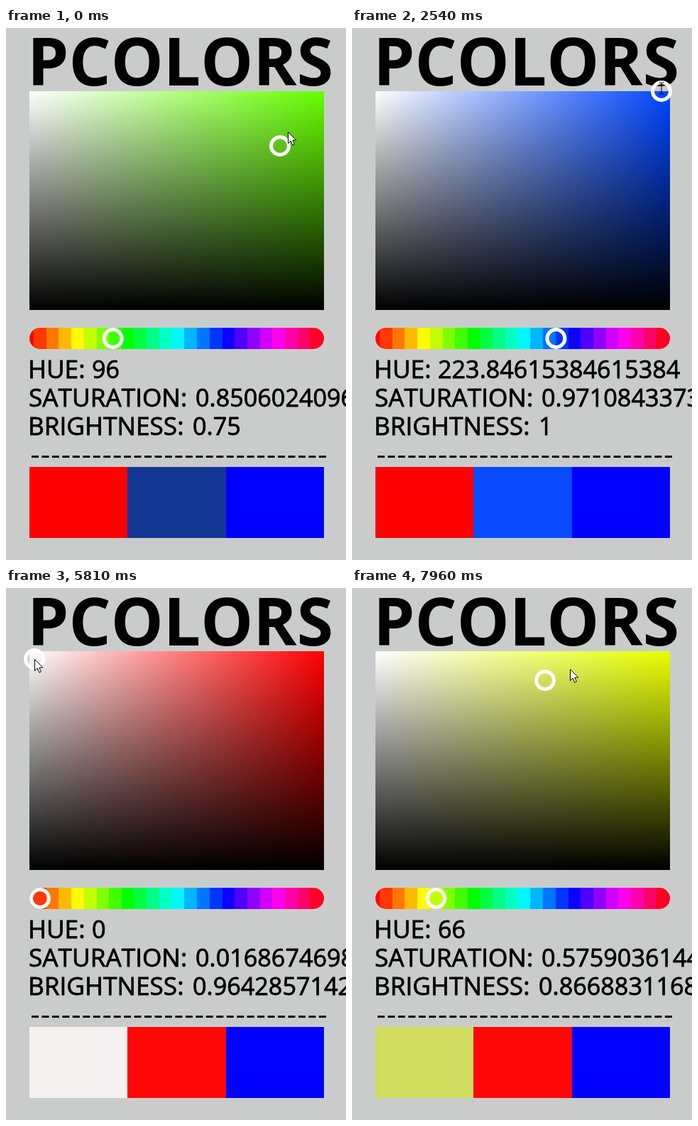
Write an HTML page that moves like this. It is 479x749 px and loops after 8000 ms.

```html
<!DOCTYPE html>
<html lang="en">
<head>
<meta charset="utf-8">
<title>Color picker</title>
<style>
  html, body { margin: 0; height: 100%; overflow: hidden; background: #cacccb; }
  svg { display: block; width: 100%; height: 100%; }
  text {
    font: 35.2px "Open Sans", "Noto Sans", sans-serif;
    font-kerning: none; stroke: #000; stroke-width: .8;
  }
  .title { font-size: 93px; font-weight: 700; stroke: none; }
  .value { font-size: 34.2px; }
  .ring { fill: none; stroke: #fff; stroke-width: 5; }
  #cursors path { fill: #fff; stroke: #000; stroke-linejoin: round; }
  #cursors #beam { fill: none; }
</style>
</head>
<body>
<svg viewBox="0 0 479 749">
  <defs>
    <linearGradient id="white">
      <stop stop-color="#fff"/><stop offset="1" stop-color="#fff" stop-opacity="0"/>
    </linearGradient>
    <linearGradient id="black" x2="0" y2="1">
      <stop stop-opacity="0"/><stop offset="1"/>
    </linearGradient>
    <clipPath id="pill"><rect x="33" y="422" width="415" height="30" rx="15"/></clipPath>
  </defs>

  <text class="title" x="30" y="81">PCOLORS</text>

  <rect id="panel" x="33" y="89" width="415" height="308"/>
  <rect x="33" y="89" width="415" height="308" fill="url(#white)"/>
  <rect x="33" y="89" width="415" height="308" fill="url(#black)"/>
  <g id="bar" clip-path="url(#pill)" shape-rendering="crispEdges"></g>

  <text x="31" y="493">HUE:</text><text class="value" id="hue" x="121" y="493"/>
  <text x="32" y="533">SATURATION:</text><text class="value" id="sat" x="267" y="533"/>
  <text x="31" y="573">BRIGHTNESS:</text><text class="value" id="bri" x="263" y="573"/>
  <path d="M36 603.5H452" stroke="#000" stroke-width="3" stroke-dasharray="10 4.46"/>

  <rect id="slot0" x="33" y="618" width="138" height="100"/>
  <rect id="slot1" x="171" y="618" width="139" height="100"/>
  <rect x="310" y="618" width="138" height="100" fill="#00f"/>

  <circle class="ring" id="colorRing" r="12.5"/>
  <circle class="ring" id="hueRing" r="12.5" cy="437"/>

  <g id="cursors">
    <path id="arrow" d="M.5 .5V16.5L4.2 13L6.8 19L9.4 17.9L6.9 12H11.8Z"/>
    <path id="hand" d="M-1.5 1.5Q0 -.5 1.5 1.5V8Q3.5 6.5 4.8 8.8Q6.8 7.5 7.8 9.6Q10.5 8.8 10.5 12V17L8.5 23.5H-1L-3 19L-7 14Q-7.5 11.5 -5 12L-1.5 15Z"/>
    <path id="beam" d="M-3.5 -8H-1L0 -7L1 -8H3.5M0 -7V7M-3.5 8H-1L0 7L1 8H3.5"/>
  </g>
</svg>

<script>
const LOOP = 8000, LEFT = 33, TOP = 89, WIDTH = 415, HEIGHT = 308, BAND = 17.7;
const $ = id => document.getElementById(id);
const clamp = (v, max) => Math.max(0, Math.min(max, v));
const set = (id, attrs) => {
  for (const name in attrs) $(id).setAttribute(name, attrs[name]);
};

// What the pointer does to the picker while it moves.
const dragColor = (p, x, y) => {
  p.color.x = Math.round(clamp(x - LEFT, WIDTH));
  p.color.y = Math.round(clamp(y - TOP, HEIGHT));
};
const dragHue = (p, x) => {
  p.color.hue = Math.round(clamp((x - 48) / 385, 1) * 780) * 6 / 13;
};
const pick = n => p => { p.color = p.slots[n]; };

// Pointer moves: start, end, x, y, action
const moves = [
  [130, 600, 455, 75, dragColor],
  [940, 1290, 268, 640],
  [1770, 2150, 389, 218, pick(1)],
  [2150, 2540, 436, 85, dragColor],
  [2540, 2610, 437, 85, dragColor],
  [2610, 2850, 287.4, 437],
  [2850, 3330, 435, 437, dragHue],
  [3440, 3580, 471, 420],
  [3720, 4300, 100, 660],
  [4300, 4850, 448, 85, pick(0)],
  [4900, 5810, 40, 100, dragColor],
  [5810, 5880, 30, 97, dragColor],
  [5880, 6160, 6, 110],
  [6230, 6650, 48, 437],
  [6850, 7200, 118.6, 437, dragHue],
  [7400, 7610, 130, 150],
  [7610, 7780, 385, 200, dragColor],
  [7780, 7900, 272, 130, dragColor],
  [7900, 7960, 307, 114]
];

// Replays all moves up to time t.
function replay(t) {
  const p = {
    x: 397, y: 146,
    color: { x: 353, y: 77, hue: 96 },
    slots: [{ x: WIDTH, y: 0, hue: 0 }, { x: 356, y: 129, hue: 485 * 6 / 13 }]
  };
  for (const [start, end, x, y, action] of moves) {
    if (t < start) break;
    const k = clamp((t - start) / (end - start), 1), ease = k * k * (3 - 2 * k);
    p.x += (x - p.x) * ease;
    p.y += (y - p.y) * ease;
    if (action) action(p, p.x, p.y);
  }
  return p;
}

function hsv(h, s, v) {
  const channel = n => {
    const k = (n + h / 60) % 6;
    return Math.round(255 * v * (1 - s * clamp(Math.min(k, 4 - k), 1)));
  };
  return `rgb(${channel(5)},${channel(3)},${channel(1)})`;
}
const satOf = c => c.x / WIDTH;
const briOf = c => (HEIGHT - c.y) / HEIGHT;
const css = c => hsv(c.hue, satOf(c), briOf(c));

for (let x = 6 - BAND; x < WIDTH; x += BAND) {
  const hue = clamp((x + BAND / 2) / WIDTH * 360, 360);
  $("bar").innerHTML +=
    `<rect x="${LEFT + x}" y="422" width="${BAND + 1}" height="30" fill="${hsv(hue, 1, 1)}"/>`;
}

function draw(t) {
  const { x, y, color, slots } = replay(t);
  set("panel", { fill: hsv(color.hue, 1, 1) });
  $("hue").textContent = color.hue;
  $("sat").textContent = satOf(color);
  $("bri").textContent = briOf(color);
  slots.forEach((slot, i) => set("slot" + i, { fill: css(slot) }));
  set("colorRing", { cx: LEFT + color.x, cy: TOP + color.y });
  set("hueRing", { cx: 48 + color.hue / 360 * 385 });

  const onBar = x > LEFT && x < LEFT + WIDTH && y > 422 && y < 452;
  const kind = onBar ? "hand" : y < TOP ? "beam" : "arrow";
  for (const c of $("cursors").children) c.style.display = c.id === kind ? "" : "none";
  set("cursors", { transform: `translate(${Math.round(x)} ${Math.round(y)})` });
}

function frame() {
  draw(performance.now() % LOOP);
  requestAnimationFrame(frame);
}
frame();
</script>
</body>
</html>
```
